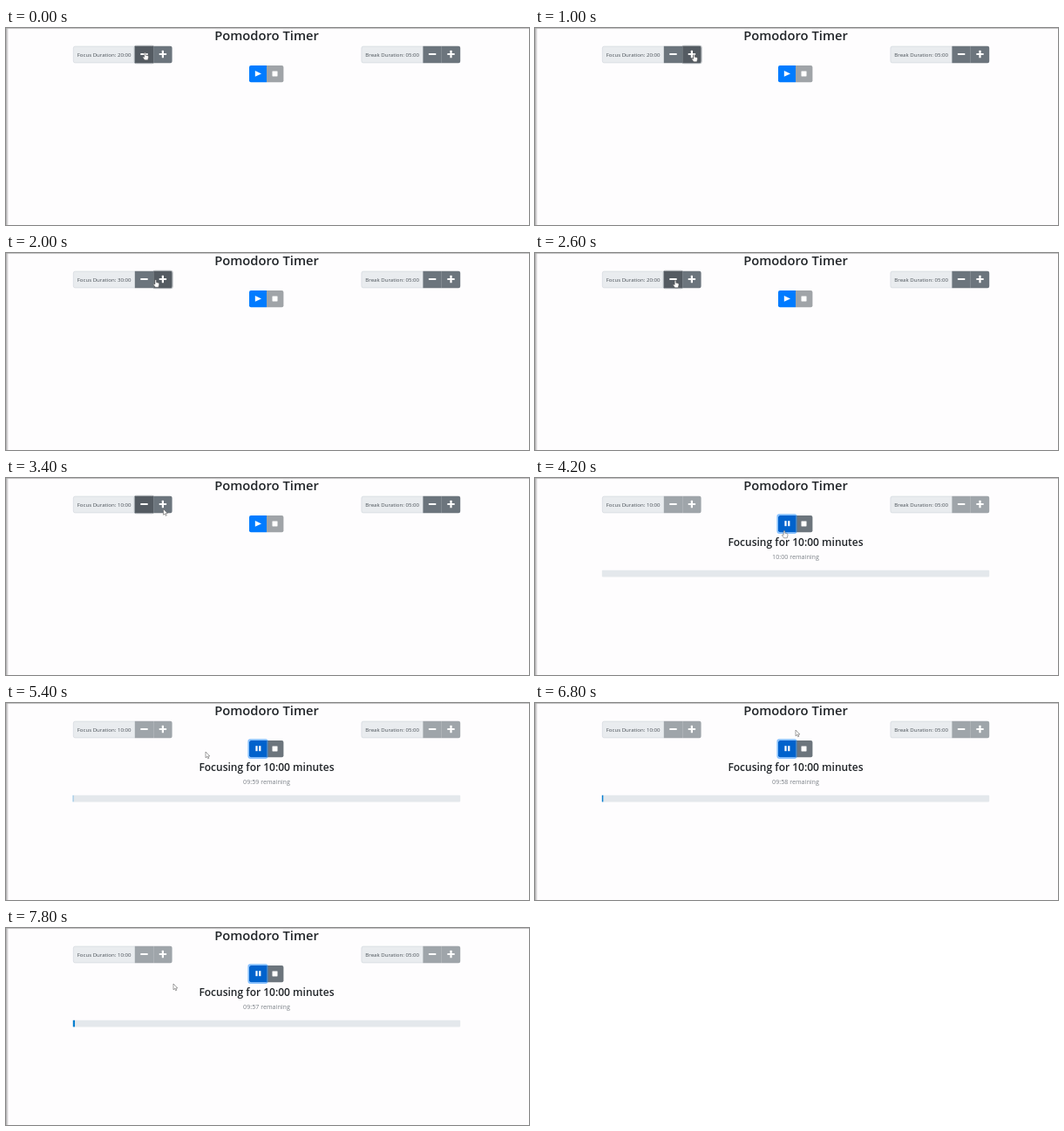
Recreate the animation shown at these times as an HTML page. Size 600 px wide and 226 px high, loop 8000 ms.

```html
<!DOCTYPE html>
<html lang="en">
<head>
<meta charset="utf-8">
<title>Pomodoro Timer</title>
<style>
  html, body { margin: 0; width: 100%; height: 100%; overflow: hidden; background: #fefdfe; }
  svg { display: block; font-family: "Open Sans", "Noto Sans", sans-serif; }
  text { text-anchor: middle; }
</style>
</head>
<body>
<svg id="stage" width="600" height="226" viewBox="0 0 600 226"></svg>
<script>
const LOOP = 8000, STEP = 200, START = 4200;
const GREY = '#6c757d', GREY_OFF = '#9fa5aa', GREY_FOCUS = '#5c646b', GREY_DOWN = '#545b62';
const BLUE = '#007bff', BLUE_DOWN = '#0062cc';

// Pointer moves; bow bends a move sideways at its middle
const moves = [
  { from: 400, to: 1000, x: 182.5, y: 30 },
  { from: 1800, to: 2200, x: 161, y: 31 },
  { from: 3200, to: 4000, x: 286, y: 60 },
  { from: 4400, to: 5400, x: 229, y: 56 },
  { from: 5600, to: 6800, x: 299, y: 31, bow: [65, 102] },
  { from: 6900, to: 7800, x: 192, y: 64 }
];

const clamp = v => Math.min(1, Math.max(0, v));
const smooth = p => p * p * (3 - 2 * p);

function pointerAt(t) {
  let x = 159.5, y = 28;
  for (const m of moves) {
    const p = smooth(clamp((t - m.from) / (m.to - m.from)));
    const [bx, by] = m.bow || [0, 0], bend = Math.sin(Math.PI * p);
    x += (m.x - x) * p + bx * bend;
    y += (m.y - y) * p + by * bend;
  }
  return [x, y];
}

const clicks = (t, first, gap, count) =>
  Math.min(count, Math.max(0, Math.floor((t - first) / gap) + 1));
const focusMinutes = t =>
  20 + 5 * (clicks(t, 1000, 400, 3) - clicks(t, 200, 400, 1) - clicks(t, 2200, 300, 4));
const clock = s => [Math.floor(s / 60), s % 60].map(n => String(n).padStart(2, '0')).join(':');

const rect = (x, y, w, h, fill, extra = '') =>
  `<rect x="${x}" y="${y}" width="${w}" height="${h}" fill="${fill}" ${extra}/>`;
const label = (x, y, size, weight, fill, s) =>
  `<text x="${x}" y="${y}" font-size="${size}" font-weight="${weight}" fill="${fill}">${s}</text>`;
const shape = (d, fill, extra = '') => `<path d="${d}" fill="${fill}" ${extra}/>`;

// Button with optional rounded left or right corners
function button(x, y, w, fill, round) {
  const h = 19.4, l = round === 'left' ? 2 : 0, r = round === 'right' ? 2 : 0;
  return shape(`M${x + l} ${y}h${w - l - r}q${r} 0 ${r} ${r}v${h - 2 * r}q0 ${r} ${-r} ${r}` +
    `h${l + r - w}q${-l} 0 ${-l} ${-l}v${2 * l - h}q0 ${-l} ${l} ${-l}z`, fill);
}

const ring = (x, y, w, colour, size) =>
  rect(x - size / 2, y - size / 2, w + size, 19.4 + size, 'none',
    `rx="2" stroke="${colour}" stroke-width="${size}" stroke-opacity=".55"`);

function stepper(x, name, time, off, focus, over) {
  const tone = key => off ? GREY_OFF : focus !== key ? GREY : over ? GREY_DOWN : GREY_FOCUS;
  const y = 20.8, w = 21.4, minus = x + 70.8, plus = minus + w;
  return rect(x + .3, y + .3, 72, 18.8, '#e9ecef', 'rx="2" stroke="#ced4da" stroke-width=".6"') +
    label(x + 35.6, 32.8, 6.1, 400, '#495057', `${name} Duration: ${time}`) +
    button(minus, y, w, tone('minus')) + button(plus, y, w, tone('plus'), 'right') +
    (over ? ring(focus === 'minus' ? minus : plus, y, w, GREY, 1) : '') +
    rect(minus + 6.5, 28.9, 8.4, 2.2, '#fff', 'rx=".5"') +
    rect(plus + 6.5, 28.9, 8.4, 2.2, '#fff', 'rx=".5"') +
    rect(plus + 9.6, 25.8, 2.2, 8.4, '#fff', 'rx=".5"');
}

function controls(running, hover) {
  const x = 279, y = 42.9, w = 20;
  const icon = running
    ? rect(286.4, 49.2, 2.2, 6, '#fff') + rect(290.2, 49.2, 2.2, 6, '#fff')
    : shape('M285.8 49l7.2 3.4-7.2 3.4z', '#fff');
  return button(x + w, y, 19.4, running ? GREY : '#a0a4a8', 'right') +
    button(x, y, w, running || hover ? BLUE_DOWN : BLUE, 'left') +
    (running ? ring(x, y, w, '#268fff', 1.6) : '') +
    icon + rect(305.5, 49.4, 6, 6, '#fff', 'rx=".4"');
}

function session(t) {
  const passed = Math.floor((t - START) / 1000);
  const ease = 1 - (1 - clamp((t - START) % 1000 / 600)) ** 2;
  const done = Math.max(0, passed - 1 + ease);
  return label(299, 78, 12, 600, '#212529', 'Focusing for 10:00 minutes') +
    label(299, 93, 7.15, 400, '#7b8187', `${clock(600 - passed)} remaining`) +
    rect(76.8, 105.8, 444.4, 7.6, '#e4e8ec', 'rx="1"') +
    rect(76.8, 105.8, done * 444.4 / 600, 7.6, '#087fd0');
}

function pointer(t, [x, y]) {
  const hand = t < 3400 || (t >= 3800 && t < 4800);
  const d = hand
    ? 'M-.8.8Q0-.5.8.8V3.2L3.2 3.8Q4.2 4.2 4 5.5L3.2 8.8H-.4L-2.6 5.8Q-2.6 4.6-.8 5.4z'
    : 'M0 0V6.8L1.6 5.4 2.7 7.8 3.8 7.3 2.7 5H4.8z';
  return `<g transform="translate(${x} ${y})">` +
    shape(d, '#fff', 'stroke="#555" stroke-width=".55"') + '</g>';
}

const fade = (id, dir) => `<linearGradient id="${id}" ${dir}><stop stop-color="#aaa"/>` +
  '<stop offset="1" stop-color="#aaa" stop-opacity="0"/></linearGradient>';

function scene(t) {
  const running = t >= START;
  const at = pointerAt(t);
  const focus = t >= 800 && t < 2200 ? 'plus' : 'minus';
  return `<defs>${fade('side', '')}${fade('top', 'x2="0" y2="1"')}</defs>` +
    rect(0, 0, 600, 226, '#fefdfe') +
    rect(0, 0, 3, 226, 'url(#side)') + rect(0, 0, 600, 1.6, 'url(#top)') +
    label(299, 14.3, 14.75, 600, '#212529', 'Pomodoro Timer') +
    stepper(77, 'Focus', clock(focusMinutes(t) * 60), running, focus, !running && at[0] < 190) +
    stepper(407.6, 'Break', '05:00', running) +
    controls(running, t >= 3800) + (running ? session(t) : '') + pointer(t, at);
}

const stage = document.getElementById('stage');
let shown = -1;
function tick(now) {
  const t = Math.floor(now % LOOP / STEP) * STEP;
  if (t !== shown) stage.innerHTML = scene(shown = t);
  requestAnimationFrame(tick);
}
tick(performance.now());
</script>
</body>
</html>
```
